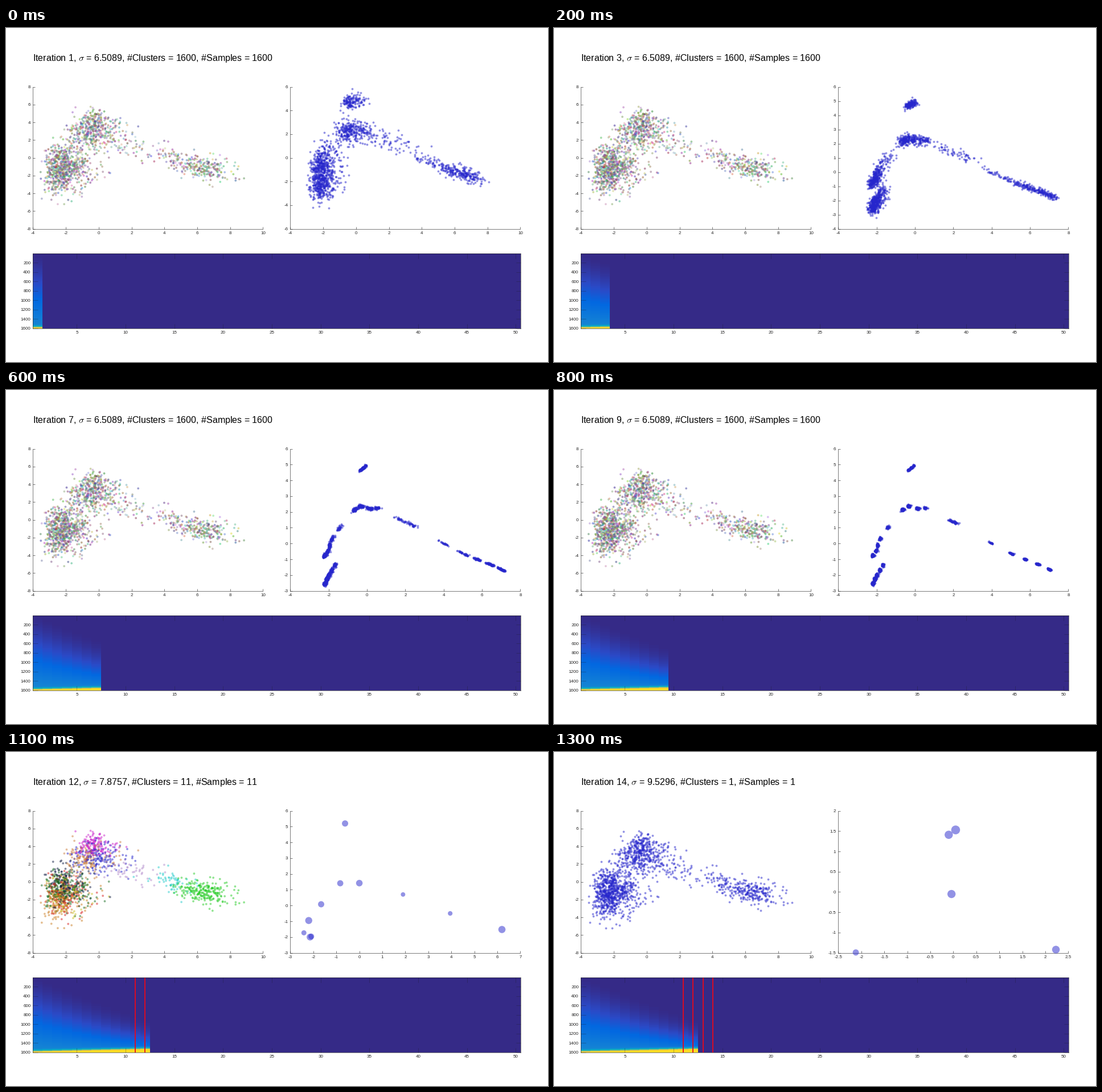
A matplotlib script for the animation above (1.4 s loop, 952 by 588 pixels).

```python
import numpy as np
import matplotlib.pyplot as plt
from matplotlib.animation import FuncAnimation
from matplotlib.colors import LinearSegmentedColormap, hsv_to_rgb, to_rgba_array

W, H, DPI = 952, 588, 64
PX = 72 / DPI  # points per pixel
INK = "#262626"
BLUE = "#2626cc"
STEPS, FIRST_MERGE = 14, 11
SIGMA = 6.50887

plt.rcParams.update({
    "font.family": "Liberation Sans",
    "mathtext.fontset": "cm",
    "axes.edgecolor": INK,
    "axes.linewidth": 0.6 * PX,
})
rng = np.random.default_rng(8)

# size, path it condenses onto, clumps on the path, spread, lift of the raw data
GROUPS = [
    (150, [(0, 5), (-.4, 4.6)], 3, (.36, .3), -.6),
    (300, [(.75, 2.3), (.2, 2.2), (-.4, 2.4), (-.8, 2)], 4, (.48, .42), .5),
    (60, [(.9, 2), (3, .8)], 1, (.5, .35), 0),
    (290, [(3.4, .4), (5.2, -.75), (6.3, -1.25), (7.3, -1.8)], 5, (.35, .28), .2),
    (350, [(-1.2, 1.4), (-1.9, .2), (-2, -.4), (-2.3, -.9)], 5, (.4, .5), -.1),
    (450, [(-1.6, -1.2), (-2, -2), (-2.25, -2.65)], 5, (.4, .58), .4),
]

# The merged samples and their colours
ELEVEN = np.array([
    (-.62, 5.2), (-.83, 1.41), (0, 1.42), (1.9, .7), (3.95, -.5), (6.2, -1.52),
    (-1.66, .08), (-2.2, -.95), (-2.41, -1.73), (-2.14, -2), (-2.09, -1.96),
])
ELEVEN_COLORS = to_rgba_array([
    "#cc26cc", "#cc8040", BLUE, "#b38ccc", "#26cccc", "#26cc26",
    "#0d1a40", "#146b1f", "#ccbf26", "#cc8026", "#d91f1f",
])
FIVE = np.array([(-2.12, -1.49), (-.1, 1.41), (2.23, -1.42), (-.04, -.05), (.05, 1.53)])


def along(path, u):
    knots = np.linspace(0, 1, len(path))
    return np.column_stack([np.interp(u, knots, axis) for axis in zip(*path)])


def make_points():
    parts = []
    for group, (n, path, clumps, spread, lift) in enumerate(GROUPS):
        u = rng.random(n) ** .7
        clump = np.floor(u * clumps)

        def noise():  # long tail to the right only
            x = np.clip(rng.gumbel(-.45, .78, n), -2, 3.8)
            return np.column_stack([x, rng.normal(size=n)]) * spread

        offset = noise()
        raw = along(path, u) + (0, lift) + noise() * (1.8, 2)
        parts.append((along(path, u), along(path, (clump + .5) / clumps), offset, raw,
                      np.full(n, group), 10 * group + clump))
    shuffle = rng.permutation(sum(g[0] for g in GROUPS))
    return [np.concatenate(p)[shuffle] for p in zip(*parts)]


base, home, offset, raw, group, clump_id = make_points()


def condensed(step):
    shrink = .6 ** (step - 1) + .08 * (step - 1) / 9
    snap = ((step - 1) / 9) ** 2.2
    return base + snap * (home - base) + shrink * offset


def random_colors(n):
    return hsv_to_rgb(rng.uniform((0, .2, .5), (1, .75, .9), (n, 3)))


def radius(labels):
    return 1.1 * np.bincount(labels) ** .32


clump = np.unique(clump_id, return_inverse=True)[1]
clump_centres = np.array([home[clump == c][0] for c in range(clump.max() + 1)])
eleven = ((condensed(1)[:, None] - ELEVEN) ** 2).sum(2).argmin(1)
five = group - (group >= 2)  # the sparse bridge joins its neighbour

# raw colours and cluster count after each merge
STAGES = [
    (random_colors(len(raw)), len(raw)),
    (random_colors(len(clump_centres))[clump], len(clump_centres)),
    (ELEVEN_COLORS[eleven], len(ELEVEN)),
    (ELEVEN_COLORS[[0, 2, 5, 7, 10]][five], len(FIVE)),
    ([BLUE], 1),
]


def heat_column(step):
    x = np.linspace(0, 1, 1600)
    start = .045 * (step - 1)
    value = .28 * np.clip((x - start) / (1 - start), 0, 1) ** (1.2 + .1 * step)
    edge = .985 - .003 * step
    return value + (.94 - value) * np.clip((x - edge + .04) / .05, 0, 1) ** 2


heat = np.zeros((1600, 50))
for col in range(FIRST_MERGE + 1):
    heat[:, col] = heat_column(col + 1)

parula = LinearSegmentedColormap.from_list("parula", [
    (0, "#352a87"), (.08, "#2b4ac7"), (.145, "#0268e1"), (.25, "#1482d5"),
    (.38, "#06a1cc"), (.5, "#17b3b5"), (.63, "#61be91"), (.76, "#abbe6e"),
    (.88, "#fabd40"), (.94, "#fadb26"), (1, "#f9fb0e"),
])

fig = plt.figure(figsize=(W / DPI, H / DPI), dpi=DPI, facecolor="white")


def panel(x, y, w, h, tick):
    ax = fig.add_axes([x / W, 1 - (y + h) / H, w / W, h / H])
    ax.tick_params(direction="in", length=tick * PX, width=.6 * PX, pad=4 * PX,
                   color=INK, labelcolor=INK, labelsize=8 * PX)
    return ax


def scatter_panel(x):
    ax = panel(x, 103.6, 404, 250, 4)
    ax.spines[["top", "right"]].set_visible(False)
    dots = ax.scatter(*raw.T, s=area(1.9), color=BLUE, alpha=.5, linewidths=0,
                      clip_on=False, zorder=3)
    return ax, dots


def set_range(ax, x, y):
    for axis, limit, (lo, hi, by) in ((ax.xaxis, ax.set_xlim, x), (ax.yaxis, ax.set_ylim, y)):
        ticks = np.arange(lo, hi + by / 2, by)
        axis.set_ticks(ticks, [f"{t:g}" for t in ticks])
        limit(lo, hi)


def area(r):
    return (2 * np.asarray(r) * PX) ** 2


title = fig.text(47 / W, 1 - 58 / H, "", fontsize=16.04 * PX, va="baseline", color="black")
left_ax, left_dots = scatter_panel(47.4)
right_ax, right_dots = scatter_panel(499.4)
set_range(left_ax, (-4, 10, 2), (-8, 8, 2))

heat_ax = panel(47.4, 397, 856.6, 132, 8.5)
heat_ax.tick_params(top=True, right=True, color=(.1, .1, .15, .5))
image = heat_ax.imshow(heat, cmap=parula, vmin=0, vmax=1, aspect="auto",
                       interpolation="nearest", extent=(.5, 50.5, 1600.5, .5))
heat_ax.set_xticks(range(5, 51, 5))
heat_ax.set_yticks(range(200, 1601, 200))
merge_lines = [heat_ax.axvline(k, color="#e8081c", lw=1.8 * PX)
               for k in range(FIRST_MERGE, STEPS + 1)]


def right_view(step):
    """Positions, radii and axis ranges of the right panel."""
    if step == 1:
        return condensed(step), [1.9], (-4, 10, 2), (-6, 6, 2)
    if step < FIRST_MERGE:
        return condensed(step), [1.9], (-4, 8, 2), (-4 if step < 4 else -3, 6, 1)
    if step == FIRST_MERGE:
        return clump_centres, radius(clump), (-4, 8, 2), (-3, 6, 1)
    if step == FIRST_MERGE + 1:
        return ELEVEN, radius(eleven), (-3, 7, 1), (-3, 6, 1)
    return FIVE, radius(five), (-2.5, 2.5, .5), (-1.5, 2, .5)


def draw(frame):
    step = frame + 1
    merges = max(0, step - FIRST_MERGE + 1)
    colors, count = STAGES[merges]
    left_dots.set_facecolor(colors)
    left_dots.set_alpha(.5)

    points, radii, x, y = right_view(step)
    right_dots.set_offsets(points)
    right_dots.set_sizes(area(radii))
    set_range(right_ax, x, y)

    image.set_data(np.where(np.arange(50) < step, heat, 0))
    for k, line in enumerate(merge_lines, FIRST_MERGE):
        line.set_visible(k <= step)
    title.set_text(rf"Iteration {step}, $\sigma$ = {SIGMA * 1.1 ** merges:.4f}, "
                   f"#Clusters = {count}, #Samples = {count}")
    return []


anim = FuncAnimation(fig, draw, frames=STEPS, interval=100, repeat=True, blit=False)
plt.show()
```
